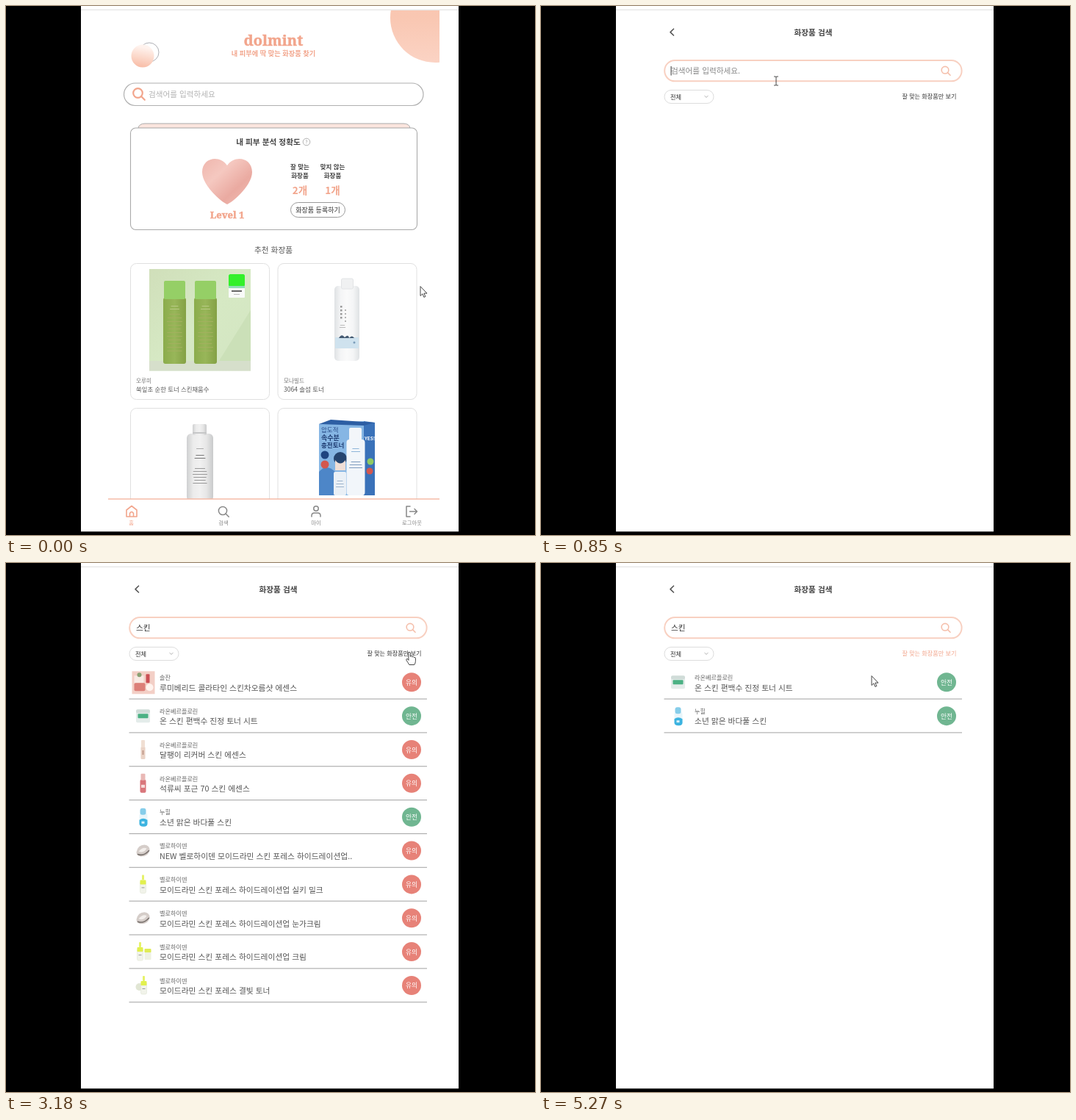
These frames come from a looping animation (720 px wide and 720 px high, 5.48 s). An HTML page:

```html
<!DOCTYPE html>
<html lang="ko">
<head>
<meta charset="utf-8">
<title>화장품 검색</title>
<style>
html, body { margin: 0; width: 100%; height: 100%; overflow: hidden; background: #000; }
svg { display: block; width: 100vw; height: 100vh; font-family: "Noto Sans CJK KR", "Noto Sans CJK", "Noto Sans KR", sans-serif; }
.serif { font-family: "Noto Serif", serif; stroke: #f2a58c; stroke-width: 0.5px; }
</style>
</head>
<body>
<svg id="stage" viewBox="0 0 720 720" xmlns="http://www.w3.org/2000/svg"></svg>
<script>
const LOOP = 5480;
const PEACH = '#f2a58c', INK = '#444', GRAY = '#666';

// Drawing helpers returning SVG markup
const text = (x, cy, size, str, fill = INK, weight = 400, anchor = 'start', extra = '') =>
  `<text x="${x}" y="${cy + size * 0.37}" font-size="${size}" fill="${fill}" font-weight="${weight}" text-anchor="${anchor}" ${extra}>${str}</text>`;
const mid = (x, cy, size, str, fill, weight, extra) => text(x, cy, size, str, fill, weight, 'middle', extra);
const rect = (x, y, w, h, fill, r = 0, stroke = 'none', sw = 1) =>
  `<rect x="${x}" y="${y}" width="${w}" height="${h}" rx="${r}" fill="${fill}" stroke="${stroke}" stroke-width="${sw}"/>`;
const circle = (x, y, r, fill, stroke = 'none', sw = 1) =>
  `<circle cx="${x}" cy="${y}" r="${r}" fill="${fill}" stroke="${stroke}" stroke-width="${sw}"/>`;
const path = (d, fill, stroke = 'none', sw = 1) =>
  `<path d="${d}" fill="${fill}" stroke="${stroke}" stroke-width="${sw}" stroke-linecap="round" stroke-linejoin="round"/>`;
const lens = (x, y, r, color, sw) =>
  circle(x, y, r, 'none', color, sw) + path(`M${x + r * 0.72} ${y + r * 0.72}l${r * 0.75} ${r * 0.75}`, 'none', color, sw);
const group = (id, body, attrs = '') => `<g id="${id}" ${attrs}>${body}</g>`;
const gradient = (id, stops, x2 = 0, y2 = 1) =>
  `<linearGradient id="${id}" x1="0" y1="0" x2="${x2}" y2="${y2}">` +
  stops.map((c, i) => `<stop offset="${i / (stops.length - 1)}" stop-color="${c}"/>`).join('') + '</linearGradient>';

const defs = '<defs>' +
  gradient('sun', ['#f9c3ac', '#f9c7b2', '#fbd3c4']) +
  gradient('ball', ['#fff3ee', '#fbd5c6', '#f7b49c'], -0.2, 1) +
  gradient('heart', ['#efb6ad', '#f5c8c0', '#eaaaa1', '#f2bfb5'], 1, 1) +
  gradient('leaf', ['#d0dfba', '#d6e9c4', '#d3e5c2'], 1, 1) +
  gradient('tube', ['#8bac4c', '#98b659', '#84a145'], 1, 0) +
  gradient('clear', ['#dfe2e4', '#f4f5f6', '#fafafa', '#f4f5f6', '#dfe2e4'], 1, 0) +
  gradient('gray', ['#cfd0d1', '#ececec', '#f1f1f1', '#e6e6e6', '#c9cacb'], 1, 0) +
  '<clipPath id="view"><rect x="139" y="6" width="451" height="665"/></clipPath></defs>';

// Home page
function tinyLines(x, y, n, w, color, step = 4) {
  let s = '';
  for (let i = 0; i < n; i++) {
    const lw = w * (0.7 + 0.3 * Math.abs(Math.sin(i * 2.3)));
    s += rect(x - lw / 2, y + i * step, lw, 1, color);
  }
  return s;
}

function greenPhoto() {
  const bottle = x =>
    rect(x, 403, 31, 90, 'url(#tube)', 3) + rect(x + 1, 380, 29, 25, '#95cf66', 2) +
    tinyLines(x + 15.5, 414, 2, 14, '#b9ca84') + tinyLines(x + 15.5, 425, 11, 21, '#a3b05f', 5);
  return rect(195, 364, 138, 138.5, 'url(#leaf)') + rect(195, 489, 138, 13.5, '#d6dfcb') +
    path('M290 489L333 420V489Z', '#cbe0b8') + bottle(214) + bottle(256) +
    rect(303, 371, 22, 32, '#f8faf8', 1) + rect(303, 371, 22, 17, '#33f02b', 2) +
    rect(303, 387, 22, 3, '#8fdcb5') + rect(307, 393, 14, 2, '#666') + rect(310, 398, 8, 1, '#bbb');
}

const waterBottle = () =>
  rect(447, 387, 34, 102, 'url(#clear)', 5) + rect(456.5, 377, 16, 14, '#f0f1f2', 2, '#e2e4e6') +
  rect(448, 457, 32, 15, '#cfe2ee') + path('M453 458q4-7 8-1q5-5 6 1zM467 458q4-5 7 0z', '#445a72') +
  [0, 1, 2, 3].map(i => rect(455, 414 + i * 5, 2.5, 2.5, '#999') + rect(461, 419 + i * 5, 2, 2, '#b5b5b5')).join('') +
  tinyLines(458, 440, 2, 9, '#bbb', 3) + circle(474, 464, 1.5, '#7b9db9');

const grayBottle = () =>
  rect(246, 588, 36, 92, 'url(#gray)', 6) + rect(254, 575, 19, 15, 'url(#gray)', 2) +
  rect(254, 586, 19, 2, '#c6c7c8') +
  tinyLines(264, 608, 1, 14, '#aaa') + tinyLines(264, 617, 2, 16, '#777') +
  tinyLines(264, 635, 6, 20, '#999', 4);

const blueBox = () =>
  path('M426 575L487 571V672H426Z', '#86b6e4') + path('M487 571L502 573V672H487Z', '#3a72b9') +
  path('M426 575L442 569L502 573L487 577Z', '#2d5ea3') +
  path('M426 640Q436 628 448 640V672H426Z', '#4d86c8') +
  circle(455, 622, 9, '#25446f') + path('M448 624q7 9 14 0v14h-14z', '#f0ded6') +
  text(429, 583, 8.5, '압도적', '#2a4d8a') + text(429, 594, 9, '속수분', '#1d3a70', 700) +
  text(429, 604, 8.5, '충전토너', '#1d3a70', 700) + text(488, 595, 6.5, 'YES!', '#fff', 700) +
  circle(434, 617, 5.5, '#1f4480') + circle(434, 630, 5.5, '#d3574f') +
  circle(496, 626, 4.5, '#8fca62') + circle(495, 639, 4.5, '#d3574f') +
  rect(467, 580, 17, 18, '#f3f6f9', 2) + rect(463.5, 596, 25, 76, '#f2f6fa', 4) +
  tinyLines(476, 608, 2, 13, '#8eb5d9') + tinyLines(476, 626, 3, 18, '#7f9cbe') +
  rect(446, 640, 17, 32, '#eaf0f6', 2) + tinyLines(454.5, 652, 3, 11, '#9db4cd');

const card = (x, y) => rect(x, y, 189, 185, '#fff', 8, '#e0e0e0');

function score(x, label, value) {
  return mid(x, 225, 8.5, label, '#444', 700) + mid(x, 237, 8.5, '화장품', '#444', 700) +
    mid(x, 257, 13.6, value, PEACH, 700);
}

const homeBody =
  circle(584, 22, 61, 'url(#sun)') +
  circle(195, 69, 13, 'none', '#9a9ca2', 0.8) + circle(186, 74, 15.5, 'url(#ball)') +
  mid(364, 52.5, 20, 'dolmint', PEACH, 900, 'class="serif"') +
  mid(364, 71, 9.2, '내 피부에 딱 맞는 화장품 찾기', PEACH, 700) +
  rect(160.5, 111, 407.5, 30.5, '#fff', 15.2, '#b0b0b0', 1.2) + lens(179.5, 124.5, 6.3, PEACH, 2.2) +
  text(194, 126.5, 10.6, '검색어를 입력하세요', '#b3b3b3') +
  path('M180 172q1-6 9-6h352q8 0 9 6z', '#fbe5de', '#aaa') +
  rect(169.5, 172, 390, 138.5, '#fff', 7, '#aaa', 1.1) +
  mid(357, 191.5, 10.7, '내 피부 분석 정확도', INK, 700) +
  circle(409, 191, 4.8, '#fff', '#aaa', 0.9) + mid(409, 191, 7, '?', '#999') +
  path('M301 276C292 272 267 250 267 232C267 212 291 208 301 223C311 208 335 212 335 232C335 250 310 272 301 276Z', 'url(#heart)') +
  mid(301, 290.5, 13, 'Level 1', PEACH, 900, 'class="serif"') +
  score(400, '잘 맞는', '2개') + score(444.5, '맞지 않는', '1개') +
  rect(387.5, 273.5, 74, 20, '#fff', 10, '#999') + mid(424.5, 283.5, 9, '화장품 등록하기', '#333', 500) +
  mid(364, 338, 10.7, '추천 화장품', '#555') +
  card(169.5, 356.5) + card(370, 356.5) + card(169.5, 553.5) + card(370, 553.5) +
  greenPhoto() + waterBottle() + grayBottle() + blueBox() +
  text(177, 516.5, 7.6, '오루미', '#777') + text(177, 528, 8.4, '쑥잎초 순한 토너 스킨채움수', '#555') +
  text(378, 516.5, 7.6, '모나빌드', '#777') + text(378, 528, 8.5, '3064 솔섬 토너', '#555');

const NAV = '#888';
const navBar =
  rect(139, 670.3, 451, 1.4, '#f4b7a1') +
  path('M164 686L171 680.5L178 686V695H164ZM168.5 695V690.5q2.5-4 5 0V695', 'none', PEACH, 1.6) +
  lens(295, 687, 5.6, NAV, 1.5) +
  circle(422, 684, 3.2, 'none', NAV, 1.5) + path('M416 695v-1.5q0-3.5 4-3.5h4q4 0 4 3.5v1.5', 'none', NAV, 1.5) +
  path('M550 681H545V695H550M549.5 688H559.5M556 684.5L559.5 688L556 691.5', 'none', NAV, 1.5) +
  mid(170.5, 703, 7.3, '홈', PEACH, 500) + mid(296, 703, 7.3, '검색', NAV) +
  mid(422, 703, 7.3, '마이', NAV) + mid(552.5, 703, 7.3, '로그아웃', NAV);

// Search page
const BEL = '벨로하이덴', RAON = '라온베르플로린', BASE = '모이드라민 스킨 포레스';
const items = [
  ['솔잔', '루미베리드 콜라타인 스킨차오름샷 에센스', 'photo', 0],
  [RAON, '온 스킨 편백수 진정 토너 시트', 'jar', 1],
  [RAON, '달팽이 리커버 스킨 에센스', 'tan', 0],
  [RAON, '석류씨 포근 70 스킨 에센스', 'red', 0],
  ['누힐', '소년 맑은 바다풀 스킨', 'blue', 1],
  [BEL, `NEW ${BEL} ${BASE} 하이드레이션업..`, 'cream', 0],
  [BEL, `${BASE} 하이드레이션업 실키 밀크`, 'lime', 0],
  [BEL, `${BASE} 하이드레이션업 눈가크림`, 'cream', 0],
  [BEL, `${BASE} 하이드레이션업 크림`, 'pair', 0],
  [BEL, `${BASE} 결빛 토너`, 'mix', 0]
];

// Thumbnails, centred on the origin
const blob = path('M-9 2Q-7-8 2-8Q9-7 9-1Q8 8-3 8Q-9 7-9 2Z', '#d5cdc9') +
  path('M-6 1Q0-6 5-3Q1 4-6 1Z', '#f3efec') + path('M-7 5Q1 8 8 0', 'none', '#77706c', 1.5);
const lime = rect(-4, -4, 8, 16, '#f1f3ea', 2, '#e0e4d4', 0.6) + rect(-4, -6, 8, 6, '#e2f04e', 1) +
  rect(-1.5, -13, 3, 7, '#e6f26a', 1) + rect(-2, 4, 4, 1, '#999');
const thumbs = {
  photo: rect(-15, -15, 31, 31, '#f3cfc6') + rect(-12, -9, 13, 10, '#f9eae4') + rect(-12, 1, 15, 11, '#dc7f78', 2) +
    rect(4, -11, 5, 12, '#cb4f55', 1) + circle(9, 7, 5, '#fff3ee') + circle(-5, -10, 3, '#8aa174'),
  jar: rect(-9.5, -8, 19, 17, '#e4ecea', 2) + rect(-9.5, -9, 19, 5, '#d0dcd8', 2) + rect(-7, -3, 14, 6, '#4bb184', 1),
  tan: rect(-3, -4, 6, 17, '#ead3c6', 1.5) + rect(-2.5, -13, 5, 10, '#f0dfd3', 1) + rect(-1, 1, 2, 6, '#c29c8b'),
  red: rect(-4, -5, 8, 18, '#d9777c', 2) + rect(-3, -13, 6, 9, '#e9b8b5', 1) + rect(-2.5, 2, 5, 4, '#f6dfdd'),
  blue: rect(-5, -6, 11, 19, '#e8f5fa', 4) + path('M-5 4Q0 0 6 4V9Q6 13 1 13Q-5 13-5 9Z', '#3cb3e0') +
    rect(-4, -12, 8, 9, '#86cdea', 3) + rect(-2, 6, 4, 3, '#d8f1fa'),
  cream: blob,
  lime,
  pair: `<g transform="translate(-4)">${lime}</g>` + rect(2, -2, 9, 13, '#eef1e2', 1) + rect(2, -4, 9, 5, '#dfec55', 1),
  mix: circle(-5, 2, 5, '#e1e6d4') + `<g transform="translate(1)">${lime}</g>`
};

const PITCH = 45.85;
function resultRow([brand, name, kind, safe], i) {
  const y = 162.3 + i * PITCH;
  return `<g transform="translate(186.5 ${y})">${thumbs[kind]}</g>` +
    text(209, y - 6.3, 8.15, brand, GRAY) + text(209, y + 7.3, 10.75, name, '#555') +
    circle(552, y, 13, safe ? '#70b691' : '#e78278') + mid(552, y + 0.3, 8.7, safe ? '안전' : '유의', '#fff', 500) +
    rect(167.5, y + 22.2, 405.5, 1.1, '#aaa');
}

const hints = items.map(([brand, name], i) => {
  let s = `${brand} ${name}`;
  if (i === 5) s = `${BEL} NEW ${BEL} 모이드라민 스킨 ..`;
  else if (i > 5 && i < 9) s = `${BEL} ${BASE} 하이드레이션..`;
  const y = 148.3 + i * 27.78;
  return text(175.5, y, 10.7, s, GRAY) + rect(167.5, y + 12.9, 405.5, 1, '#e0e0e0');
}).join('');

const searchBody =
  path('M180.5 31.2L176 35.6L180.5 40', 'none', '#555', 1.6) +
  mid(370.5, 36.3, 10.65, '화장품 검색', INK, 700) +
  rect(168.2, 74, 404.4, 28.3, '#fff', 14.1, '#f8d0c1', 2) + lens(550, 87.2, 4.8, '#f5bfab', 1.6) +
  '<text id="query" x="177" y="92.2" font-size="10.65"></text>' +
  group('caret', rect(176.6, 82, 1, 12.5, '#333')) +
  rect(168, 114.5, 67, 18, '#fff', 9, '#ddd') + mid(183.5, 124, 8.2, '전체', '#333', 500) +
  path('M222.8 122.4L225 124.4L227.2 122.4', 'none', '#aaa', 0.9) +
  text(565.5, 123.3, 8.15, '잘 맞는 화장품만 보기', '#333', 400, 'end', 'id="link"') +
  group('hints', hints) +
  group('all', items.map(resultRow).join('')) +
  group('safe', items.filter(it => it[3]).map(resultRow).join(''));

// Pointers, hotspot at the origin
const pointers =
  group('arrow', path('M0 0V12.5L2.9 9.8L4.9 14.4L6.9 13.5L4.9 9.1H8.6Z', '#fff', '#333', 0.9)) +
  group('hand', path('M-1.2 1Q0-.8 1.2 1V6.2Q3 5.2 3.8 6.7Q5.6 5.9 6.2 7.3Q8.4 6.7 8.4 9V12.5Q8.4 15 6.8 17.5H-.2Q-1.8 14.5-3.8 11.8Q-4.8 9.6-3.2 9.3Q-2.2 9.4-1.2 11Z', '#fff', '#333', 0.9)) +
  group('beam', path('M-2.5-6H-.8L0-5.3L.8-6H2.5M0-5.3V5.3M-2.5 6H-.8L0 5.3L.8 6H2.5', 'none', '#333', 0.9));

const $ = id => document.getElementById(id);
$('stage').innerHTML = defs + rect(0, 0, 720, 720, '#000') + rect(102, 0, 514, 715.3, '#fff') +
  rect(102, 4.6, 514, 1.2, '#e3e3e3') +
  group('home', `<g clip-path="url(#view)">${group('scroll', homeBody)}</g>` + navBar) +
  group('search', searchBody) + group('pointer', pointers);

// Step tables: [start ms, value...]
const OPEN = 330;
const scrollSteps = [[0, -6], [30, -4], [60, -2], [90, 0]];
const listSteps = [[0, ''], [1240, 'hints'], [1910, 'safe'], [3180, 'all'], [4360, 'safe']];
const linkSteps = [[0, '#333'], [1630, PEACH], [2970, '#333'], [4360, PEACH]];
const typeSteps = [[0, ''], [910, 'ㅅ'], [970, '스'], [1030, '슼'], [1090, '스키'], [1240, '스킨']];
const caretSteps = [[0, false], [580, true], [910, false]];
const pointerSteps = [
  [0, 'arrow', 564, 382], [30, 'arrow', 480, 300], [60, 'arrow', 392, 214], [90, 'hand', 311, 135],
  [170, 'hand', 312, 131], [250, 'hand', 313, 128], [330, 'arrow', 315, 122], [410, 'arrow', 317, 114],
  [490, 'beam', 319, 105], [550, 'beam', 320, 102],
  [1520, 'beam', 384, 100], [1570, 'arrow', 470, 112], [1630, 'hand', 543, 120], [1690, 'hand', 553, 104], [1730, 'hand', 560, 87],
  [2180, 'arrow', 552, 128], [2240, 'arrow', 540, 180], [2390, 'arrow', 533, 160], [2520, 'arrow', 527, 140],
  [2670, 'arrow', 533, 130], [2730, 'arrow', 538, 129], [2940, 'hand', 546, 124], [2970, 'hand', 549, 121],
  [3700, 'hand', 549, 123], [3740, 'hand', 549, 125], [3780, 'hand', 548, 127], [3820, 'hand', 548, 129],
  [4760, 'arrow', 536, 132], [5240, 'arrow', 490, 144], [5270, 'arrow', 450, 154]
];

const at = (steps, t) => steps.findLast(s => s[0] <= t).slice(1);
const show = (id, on) => $(id).setAttribute('display', on ? 'inline' : 'none');

function draw(t) {
  show('home', t < OPEN);
  show('search', t >= OPEN);
  $('scroll').setAttribute('transform', `translate(0 ${at(scrollSteps, t)[0]})`);

  const [list] = at(listSteps, t);
  for (const id of ['hints', 'all', 'safe']) show(id, id === list);
  $('link').setAttribute('fill', at(linkSteps, t)[0]);

  const [typed] = at(typeSteps, t);
  $('query').textContent = typed || '검색어를 입력하세요.';
  $('query').setAttribute('fill', typed ? '#333' : '#888');
  show('caret', at(caretSteps, t)[0]);

  const [kind, x, y] = at(pointerSteps, t);
  for (const id of ['arrow', 'hand', 'beam']) show(id, id === kind);
  $('pointer').setAttribute('transform', `translate(${x} ${y})`);
}

const start = performance.now();
function tick(now) {
  draw(Math.max(0, now - start) % LOOP);
  requestAnimationFrame(tick);
}
draw(0);
requestAnimationFrame(tick);
</script>
</body>
</html>
```
